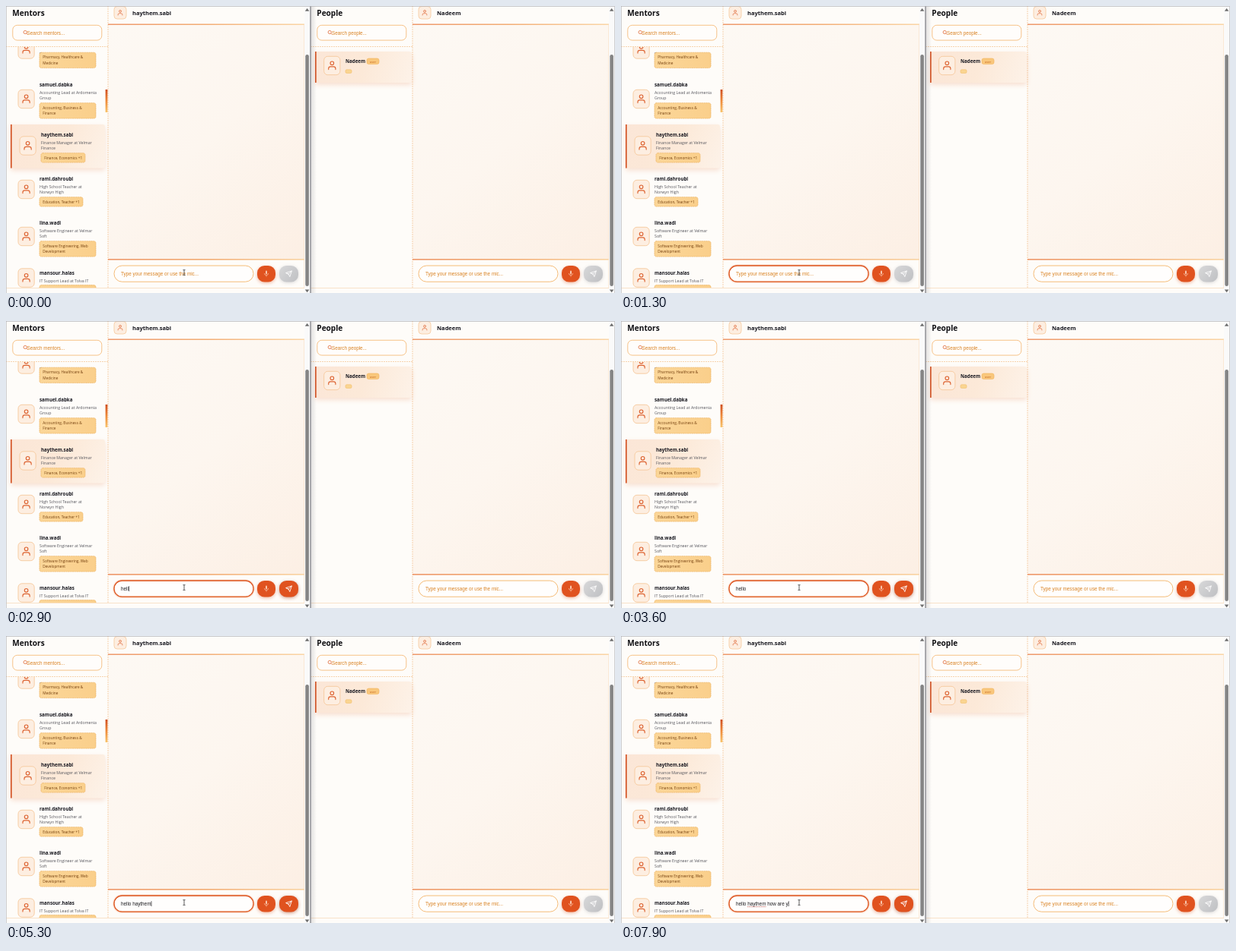
Animation of 800x378 px, one loop 8000 ms. Source, as an HTML page with a canvas:

```html
<!DOCTYPE html>
<html lang="en">
<head>
<meta charset="utf-8">
<title>Mentor chat</title>
<style>
html, body { margin: 0; width: 100%; height: 100%; overflow: hidden; background: #fefcf9; }
canvas { display: block; width: 100vw; height: 100vh; }
</style>
</head>
<body>
<canvas id="stage"></canvas>
<script>
const W = 800, H = 378, LOOP = 8000;
const UI = '"Open Sans", "Noto Sans", sans-serif';
const FIELD = '"Liberation Sans", Arial, sans-serif';
const INK = '#17171f', ORANGE = '#e0521f', AMBER = '#f4b46a', HINT = '#d98223';

const canvas = document.getElementById('stage');
const dpr = window.devicePixelRatio || 1;
canvas.width = W * dpr;
canvas.height = H * dpr;
const ctx = canvas.getContext('2d');

const mentors = [
  { y: 47, x: 44, icon: 57, desc: ['', 'Pharma'], tag: ['Pharmacy, Healthcare &', 'Medicine'], w: 74 },
  { y: 105.5, x: 44, icon: 122.5, name: 'samuel.dabka', desc: ['Accounting Lead at Ardomenia', 'Group'], tag: ['Accounting, Business &', 'Finance'], w: 74 },
  { y: 171.5, x: 46, icon: 184, name: 'haythem.sabi', desc: ['Finance Manager at Velmar', 'Finance'], tag: ['Finance, Economics +1'], w: 58 },
  { y: 229.5, x: 44, icon: 241.5, name: 'rami.dahroubi', desc: ['High School Teacher at', 'Norwyn High'], tag: ['Education, Teacher +1'], w: 57 },
  { y: 287.5, x: 44, icon: 303.5, name: 'lina.wadi', desc: ['Software Engineer at Velmar', 'Soft'], tag: ['Software Engineering, Web', 'Development'], w: 74 },
  { y: 353.8, x: 44, icon: 358, name: 'mansour.halas', desc: ['IT Support Lead at Tolva IT'], tag: ['IT, Support'], w: 74 }
];

const message = 'hello haythem how are y';
const focusAt = 700;
const keys = [2100, 2400, 2600, 2800, 3000,
  3800, 3950, 4100, 4250, 4450, 4650, 4850, 5100,
  5700, 6500, 6650, 6800, 6950, 7100, 7250, 7400, 7550, 7750];

const clamp = v => Math.max(0, Math.min(1, v));

function text(str, x, y, size, color, weight = 400, family = UI) {
  ctx.font = `${weight} ${size}px ${family}`;
  ctx.fillStyle = color;
  ctx.fillText(str, x, y);
}

function rect(x, y, w, h, fill) {
  ctx.fillStyle = fill;
  ctx.fillRect(x, y, w, h);
}

function box(x, y, w, h, r, fill, stroke, width = 0.8, dash = []) {
  ctx.beginPath();
  ctx.roundRect(x, y, w, h, r);
  if (fill) { ctx.fillStyle = fill; ctx.fill(); }
  if (stroke) {
    ctx.strokeStyle = stroke;
    ctx.lineWidth = width;
    ctx.setLineDash(dash);
    ctx.stroke();
    ctx.setLineDash([]);
  }
}

function blend(x0, y0, x1, y1, ...colors) {
  const g = ctx.createLinearGradient(x0, y0, x1, y1);
  colors.forEach((c, i) => g.addColorStop(i / (colors.length - 1), c));
  return g;
}

function line(points, color, width = 1, dash = []) {
  ctx.beginPath();
  points.forEach(([x, y], i) => i ? ctx.lineTo(x, y) : ctx.moveTo(x, y));
  ctx.strokeStyle = color;
  ctx.lineWidth = width;
  ctx.setLineDash(dash);
  ctx.stroke();
  ctx.setLineDash([]);
}

function shadowed(color, blur, dy, draw) {
  ctx.save();
  ctx.shadowColor = color;
  ctx.shadowBlur = blur * dpr;
  ctx.shadowOffsetY = dy * dpr;
  draw();
  ctx.restore();
}

function person(cx, cy, s) {
  ctx.strokeStyle = '#dd6534';
  ctx.lineWidth = 1.15 * s;
  ctx.lineCap = 'round';
  ctx.beginPath();
  ctx.arc(cx, cy - 2.7 * s, 2.3 * s, 0, Math.PI * 2);
  ctx.stroke();
  ctx.beginPath();
  ctx.moveTo(cx - 4.6 * s, cy + 5.6 * s);
  ctx.lineTo(cx - 4.6 * s, cy + 4.5 * s);
  ctx.quadraticCurveTo(cx - 4.6 * s, cy + 1.9 * s, cx - 2 * s, cy + 1.9 * s);
  ctx.lineTo(cx + 2 * s, cy + 1.9 * s);
  ctx.quadraticCurveTo(cx + 4.6 * s, cy + 1.9 * s, cx + 4.6 * s, cy + 4.5 * s);
  ctx.lineTo(cx + 4.6 * s, cy + 5.6 * s);
  ctx.stroke();
  ctx.lineCap = 'butt';
}

function avatar(cx, cy) {
  box(cx - 10.6, cy - 12.2, 21.2, 24.4, 5, '#fdeee1', '#f7c99c', 0.9);
  person(cx, cy - 0.5, 1);
}

function tag(x, y, w, lines) {
  const h = lines.length > 1 ? 20.4 : 12.4;
  box(x, y, w, h, 2.5, blend(x, y, x + w, y, '#fbd698', '#facf8b'), '#edb160', 0.8, [1.6, 0.8]);
  lines.forEach((s, i) => text(s, x + 4.3, y + 8 + i * 7.6, 4.75, '#75400f', 500));
}

function selected(x, y, w, h) {
  shadowed('rgba(224,110,50,.2)', 6, 3, () =>
    box(x, y, w, h, 3, blend(x, y, x + w, y + h, '#fbe6d7', '#fce9d8', '#fdf2e8')));
  rect(x, y, 1.7, h, '#d4572a');
}

function mentorList() {
  ctx.save();
  ctx.beginPath();
  ctx.rect(0, 54, 134, 317);
  ctx.clip();
  selected(6, 156, 124, 57.5);
  for (const m of mentors) {
    avatar(m.x - 17.4, m.icon);
    if (m.name) text(m.name, m.x, m.y, 6.2, INK, 700);
    m.desc.forEach((s, i) => text(s, m.x, m.y + 10.2 + i * 7.6, 5.25, '#55555c'));
    tag(m.x, m.y + (m.desc.length > 1 ? 22.2 : 13.8) - (m.y < 50 ? 8 : 0), m.w, m.tag);
  }
  ctx.restore();
  rect(130.6, 110, 2.8, 30, blend(0, 110, 0, 140, '#cf4f20', '#ee8a3a', '#f8c46c'));
}

function peopleList() {
  selected(406, 60, 127, 41);
  avatar(428.3, 78.5);
  text('Nadeem', 446, 75, 6.2, INK, 700);
  box(474, 69, 16, 7.6, 2.5, '#f9c77c', '#f2b45c', 0.6);
  text('user', 477.8, 74.6, 4, '#c2601a', 500);
  box(446, 83.8, 8, 4.6, 1.5, '#fad592', '#f2bd68', 0.6);
}

function micButton(x) {
  shadowed('rgba(215,80,30,.4)', 4, 1.5, () => box(x, 342, 24, 21.6, 9.5, ORANGE));
  const cx = x + 12;
  box(cx - 1, 348.5, 2, 4.8, 1, '#f9c6ad');
  ctx.beginPath();
  ctx.arc(cx, 352, 2.6, 0, Math.PI);
  ctx.strokeStyle = '#f9c6ad';
  ctx.lineWidth = 0.7;
  ctx.stroke();
  line([[cx, 354.6], [cx, 356.6]], '#f9c6ad', 0.7);
}

function sendButton(x, on) {
  shadowed('rgba(110,110,120,.25)', 4, 1, () =>
    box(x, 342, 25, 21.6, 9.5, blend(x, 342, x + 25, 363, '#d8d8d9', '#bfc0c3')));
  if (on > 0) {
    ctx.globalAlpha = on;
    shadowed('rgba(215,80,30,.4)', 4, 1.5, () => box(x, 342, 25, 21.6, 9.5, ORANGE));
    ctx.globalAlpha = 1;
  }
  const p = (dx, dy) => [x + 12.5 + dx, 352.7 + dy];
  line([p(-3.8, -1.2), p(3.9, -3.8), p(1.3, 3.9), p(-0.4, 0.4), p(-3.8, -1.2), p(-0.4, 0.4), p(3.9, -3.8)], '#fff', 0.85);
}

function scrollbar(x) {
  rect(x, 0, 7, H, '#fafafa');
  box(x + 1.3, 64, 4.6, 305, 2.3, '#858585');
  ctx.fillStyle = '#6c6c6c';
  for (const [tip, base] of [[3, 6.8], [377.3, 373.6]]) {
    ctx.beginPath();
    ctx.moveTo(x + 3.6, tip);
    ctx.lineTo(x + 6.4, base);
    ctx.lineTo(x + 0.8, base);
    ctx.fill();
  }
}

function pane(x, title, hint, contact) {
  rect(x, 0, 400, H, '#fefcf9');
  rect(x + 134, 24, 258, 310, blend(x + 134, 24, x + 392, 334, '#fdf9f4', '#fdf6ef', '#fcefe4'));

  text(title, x + 8.3, 12.6, 10.1, '#101014', 700);
  box(x + 8.8, 25.3, 117, 19.8, 6, '#fffdfb', '#f5bd7c', 0.9);
  ctx.beginPath();
  ctx.arc(x + 25.2, 34.5, 2.1, 0, Math.PI * 2);
  ctx.strokeStyle = '#df6a36';
  ctx.lineWidth = 0.8;
  ctx.stroke();
  line([[x + 26.7, 36], [x + 28.2, 37.5]], '#df6a36', 0.8);
  text(hint, x + 28 + (x ? 0 : -0.5), 37.6, 6.3, HINT, 400, FIELD);
  line([[x, 53.5], [x + 134, 53.5]], '#f7d0a6', 0.9, [2, 1]);
  line([[x + 134, 0], [x + 134, 371]], '#f6cda4', 0.9, [2, 1]);

  box(x + 142, 0.5, 16, 16.5, 4, '#fdeee1', '#f7c99c', 0.8);
  person(x + 150, 8.6, 0.62);
  text(contact, x + 166, 11.5, 7.5, INK, 700);

  const rule = blend(x + 134, 0, x + 392, 0, '#ea8049', '#f09a55', '#f9cd92');
  rect(x + 134, 23.6, 258, 1.2, rule);
  rect(x + 134, 333.2, 258, 1.3, rule);
  line([[x, 371.5], [x + 392, 371.5]], '#f9dfc5', 0.9);
  line([[x + 391.8, 24], [x + 391.8, 371]], '#f9dcc0', 0.8);
}

function composer(x, focus, typed) {
  if (focus > 0) box(x + 142, 342, 183, 21.2, 10.5, null, `rgba(240,130,70,${0.22 * focus})`, 3.6);
  box(x + 142, 342, 183, 21.2, 10.5, '#fffefd', '#f3b468', 0.9);
  if (focus > 0) box(x + 142, 342, 183, 21.2, 10.5, null, `rgba(222,90,42,${focus})`, 1.3);
  if (typed) text(typed, x + 151, 354.8, 6.33, '#1c1c20', 400, FIELD);
  else text('Type your message or use the mic...', x + 151, 354.8, 6.33, HINT, 400, FIELD);
}

function caretAndSpelling(t, typed) {
  ctx.font = `400 6.33px ${FIELD}`;
  const width = s => ctx.measureText(s).width;
  if (typed.length > 13) {
    line([[151 + width('hello '), 356.6], [151 + width('hello haythem'), 356.6]], '#b5443f', 0.8, [1, 0.8]);
  }
  const last = typed ? keys[typed.length - 1] : focusAt;
  if (t >= focusAt && (t - last) % 1000 < 500) {
    rect(151.2 + width(typed), 349.2, 0.7, 6.8, '#1c1c20');
  }
}

function ibeam(x, y) {
  line([[x - 1.6, y - 3.4], [x + 1.6, y - 3.4]], '#333', 0.7);
  line([[x, y - 3.4], [x, y + 3.4]], '#333', 0.8);
  line([[x - 1.6, y + 3.4], [x + 1.6, y + 3.4]], '#333', 0.7);
}

function draw(t) {
  ctx.setTransform(dpr, 0, 0, dpr, 0, 0);
  const typed = message.slice(0, keys.filter(k => k <= t).length);

  pane(0, 'Mentors', 'Search mentors...', 'haythem.sabi');
  mentorList();
  composer(0, clamp((t - focusAt) / 200), typed);
  caretAndSpelling(t, typed);
  micButton(330);
  sendButton(359, clamp((t - keys[0] + 50) / 150));
  scrollbar(392);

  pane(400, 'People', 'Search people...', 'Nadeem');
  peopleList();
  composer(400, 0, '');
  micButton(730);
  sendButton(759, 0);
  scrollbar(792);

  rect(401, 0, 7, H, blend(401, 0, 408, 0, 'rgba(90,90,100,.16)', 'rgba(90,90,100,0)'));
  rect(399.2, 0, 1.7, H, '#9a9a9e');
  rect(0, 0, 0.8, H, '#c4c4c6');
  rect(0, 0, W, 0.7, '#b4b4b8');
  rect(799.2, 0, 0.8, H, '#c4c4c6');
  ibeam(234, 351);
}

function tick() {
  draw(performance.now() % LOOP);
  requestAnimationFrame(tick);
}
tick();
</script>
</body>
</html>
```
